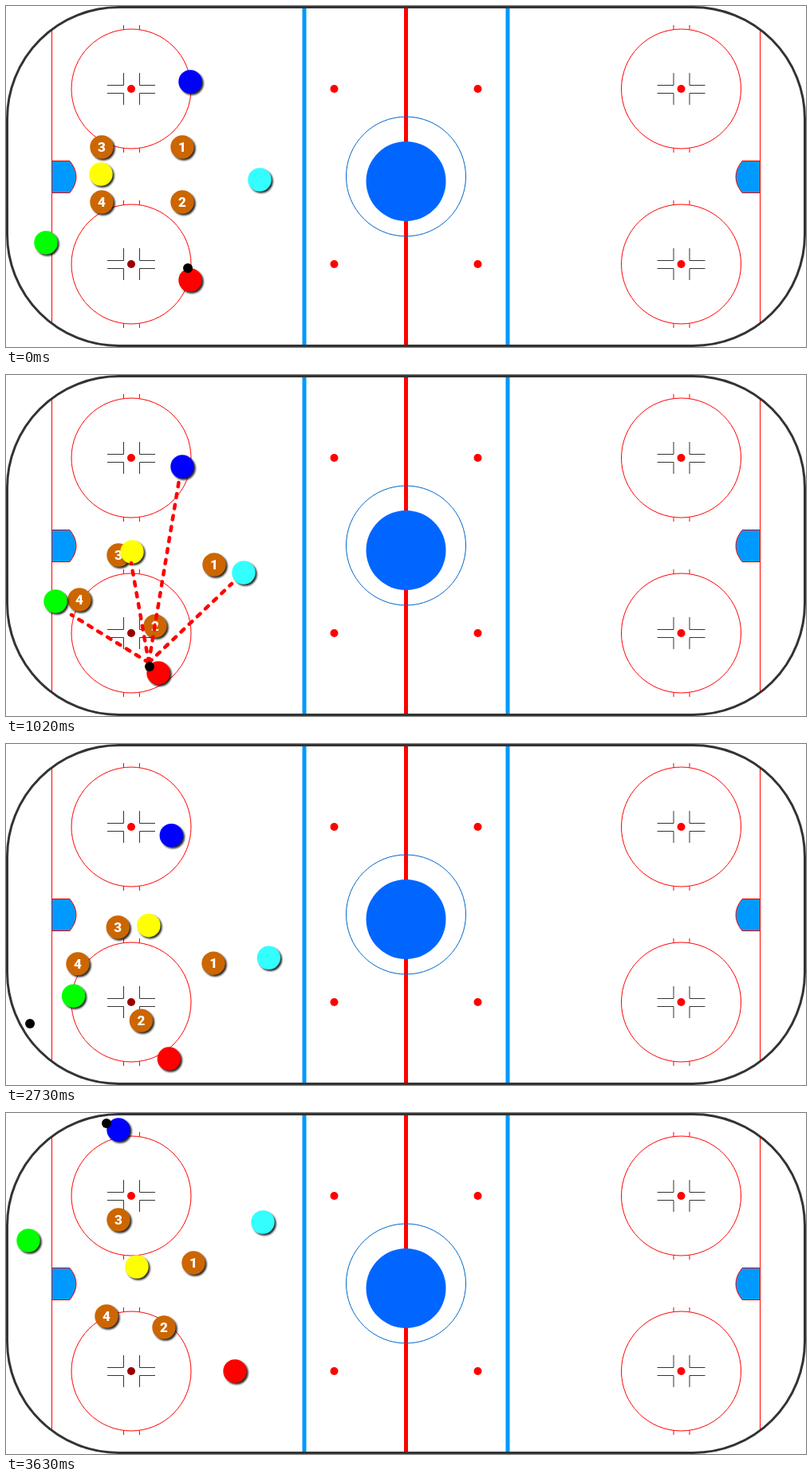
Recreate the animation shown at these times as an HTML page. Size 1003 px wide and 428 px high, loop 5.1 s.

```html
<!DOCTYPE html>
<html lang="en">
<head>
<meta charset="utf-8">
<title>Hockey drill</title>
<style>
  html, body { margin: 0; width: 100%; height: 100%; overflow: hidden; background: #fff; }
  svg { display: block; width: 1003px; height: 428px; }
  .token { filter: drop-shadow(2.5px 2.5px .8px rgba(0, 0, 0, .85)); }
  text { font: 900 17px Roboto, "Open Sans", sans-serif; font-stretch: condensed; fill: #fff; text-anchor: middle; }
</style>
</head>
<body>
<svg viewBox="0 0 1003 428">
  <defs>
    <g id="spot" fill="none">
      <circle r="75" stroke="#f00"/>
      <path stroke="#f00" d="M-9.5-74.5v-5.5M10.5-74.5v-5.5M-9.5 74.5v5.5M10.5 74.5v5.5"/>
      <path stroke="#333" d="M-30-4.5H-9.5V-20M30-4.5H10.5V-20M-30 5.5H-9.5V20M30 5.5H10.5V20"/>
    </g>
    <path id="crease" d="M57.5 194.5H80Q96 214.5 80 234.5H57.5Z" fill="#09f" stroke="#f00"/>
  </defs>
  <path d="M57.5 31V398M945.5 31V398" stroke="#f00"/>
  <use href="#crease"/>
  <use href="#crease" transform="matrix(-1 0 0 1 1003 0)"/>
  <path d="M374 2V426M629 2V426" stroke="#09f" stroke-width="5"/>
  <path d="M501.5 2V426" stroke="#f00" stroke-width="5"/>
  <circle cx="501.5" cy="214" r="75" fill="none" stroke="#06c"/>
  <circle cx="501.5" cy="220" r="50" fill="#06f"/>
  <g id="spots"></g>
  <rect x="1.5" y="1.5" width="1000" height="425" rx="140" fill="none" stroke="#333" stroke-width="3"/>
  <g id="tokens"></g>
  <path id="passes" d="M179 361L82 301M179 361L157 236M179 361L217 132M179 361L283 262"
        fill="none" stroke="#f00" stroke-width="4.5" stroke-linecap="round" stroke-dasharray="5 9"/>
  <g id="puckLayer"></g>
</svg>
<script>
const LOOP = 5100, STEP = 30;
const moves = [
  { at: 600, steps: 15 },
  { at: 2220, steps: 17 },
  { at: 2730, steps: 18 },
  { at: 3270, steps: 13 }
];

const byId = id => document.getElementById(id);

function add(parent, tag, attrs, text = '') {
  const node = document.createElementNS('http://www.w3.org/2000/svg', tag);
  for (const key in attrs) node.setAttribute(key, attrs[key]);
  node.textContent = text;
  parent.append(node);
  return node;
}

for (const y of [104, 324]) {
  for (const x of [157, 846.5]) add(byId('spots'), 'use', { href: '#spot', x, y });
  for (const x of [157, 411.5, 591.5, 846.5]) {
    const fill = x === 157 && y === 324 ? '#900' : '#f00';
    add(byId('spots'), 'circle', { cx: x, cy: y, r: 5, fill });
  }
}

// A route is a start point followed by one path command list per move.
function makeLegs(route) {
  const parts = route.split('|');
  return parts.slice(1).map((leg, i) => {
    const start = parts[i].match(/\d+ \d+$/)[0];
    const path = document.createElementNS('http://www.w3.org/2000/svg', 'path');
    path.setAttribute('d', `M${start}${leg}`);
    return { path, length: path.getTotalLength() };
  });
}

function makeToken(fill, route, label) {
  const node = add(byId('tokens'), 'g', {});
  add(node, 'circle', { r: 14.7, fill, class: 'token' });
  if (label) add(node, 'text', { y: 6 }, label);
  return { node, legs: makeLegs(route) };
}

function makePuck(route) {
  const node = add(byId('puckLayer'), 'circle', { r: 6 });
  return { node, legs: makeLegs(route) };
}

const brown = '#c60';
const bodies = [
  makeToken(brown, '221 177|Q231 215 261 238|L261 278|L244 228|L235 188', '1'),
  makeToken(brown, '221 246|Q221 285 187 315|L169 350|L176 298|L198 269', '2'),
  makeToken(brown, '120 177|L141 226|L141 232|L127 195|L141 134', '3'),
  makeToken(brown, '120 246|L92 282|L89 277|L107 256|L126 255', '4'),
  makeToken('#f00', '231 344|Q221 366 191 374|L201 397|L261 362|L287 324'),
  makeToken('#0f0', '50 297|Q64 297 62 284|L87 321|L44 235|L28 160'),
  makeToken('#ff0', '119 211|L158 222|L179 229|L177 206|L164 193'),
  makeToken('#00f', '231 95|Q236 109 221 115|L209 118|L178 58|L141 21'),
  makeToken('#3ff', '318 218|L298 248|L329 273|L336 188|L322 137'),
  makePuck('228 329|Q212 360 180 366|Q165 418 140 418A131 131 0 0 1 38 362' +
    '|A130 130 0 0 1 9 286V142A130 130 0 0 1 15 127|A130 130 0 0 1 126 13')
];

function draw() {
  const t = performance.now() % LOOP;
  const index = Math.max(0, moves.findLastIndex(move => t >= move.at));
  const { at, steps } = moves[index];
  const step = Math.floor((t - at) / STEP) + 1;
  const progress = Math.min(1, Math.max(0, step / steps));

  for (const { node, legs } of bodies) {
    const { path, length } = legs[index];
    const p = path.getPointAtLength(length * progress);
    node.setAttribute('transform', `translate(${p.x} ${p.y})`);
  }
  byId('passes').style.display = t >= 1020 && t < 2190 ? '' : 'none';
  requestAnimationFrame(draw);
}
draw();
</script>
</body>
</html>
```
